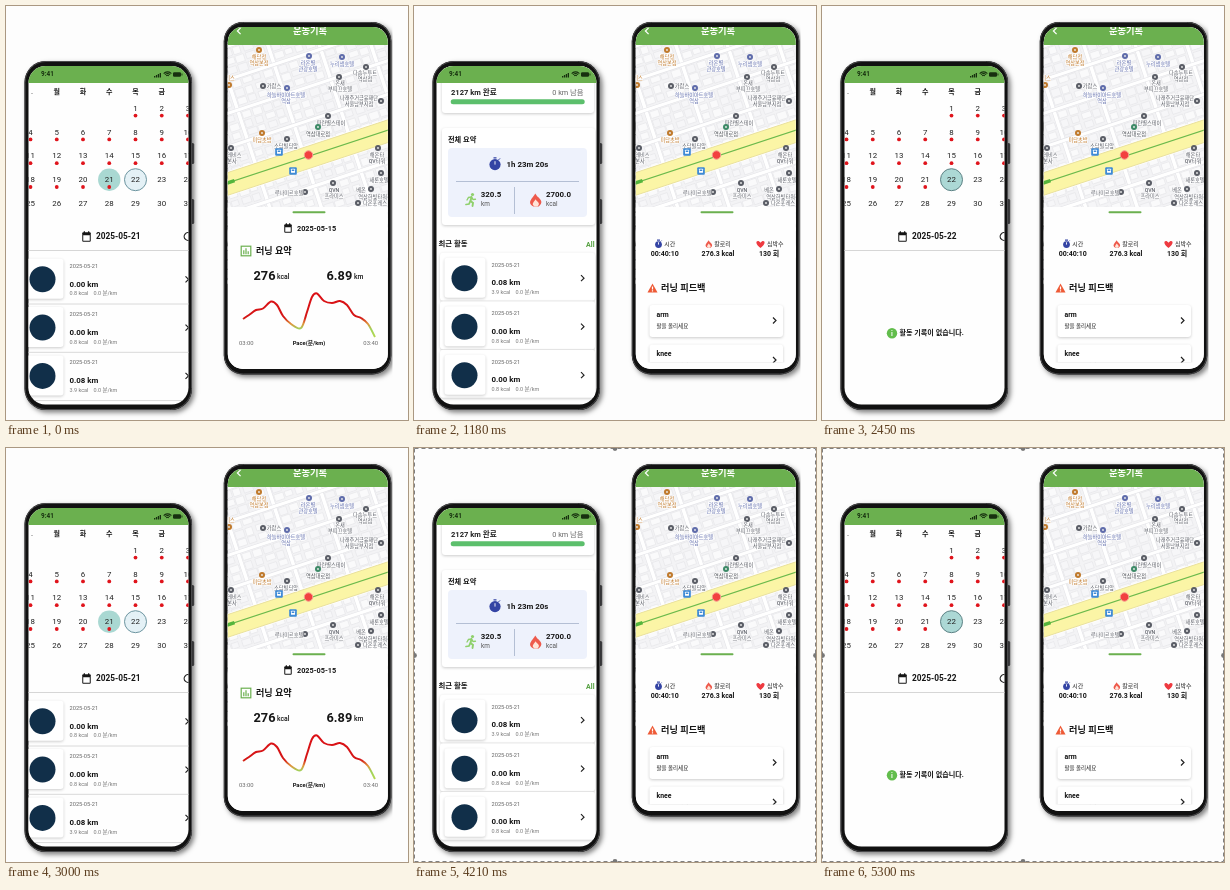
Write an HTML page with a canvas that moves like this. It is 402x414 px and loops after 5.33 s.

```html
<!DOCTYPE html>
<html lang="ko">
<head>
<meta charset="utf-8">
<title>Running app screens</title>
<style>
html, body { margin: 0; width: 100%; height: 100%; overflow: hidden; background: #fdfdfd; }
canvas { display: block; width: 402px; height: 414px; }
</style>
</head>
<body>
<canvas id="stage"></canvas>
<script>
const W = 402, H = 414, LOOP = 5330, CYCLE = 3270;
const FONT = 'Roboto, "Noto Sans CJK KR", "Noto Sans CJK", sans-serif';
const GREEN = '#6bb04f', INK = '#161616', GREY = '#777', RED = '#e0141c';
const canvas = document.getElementById('stage');
const c = canvas.getContext('2d');
const dpr = window.devicePixelRatio || 1;
canvas.width = W * dpr;
canvas.height = H * dpr;

function text(s, x, y, size, color = INK, weight = 400, align = 'left') {
  c.font = `${weight} ${size}px ${FONT}`;
  c.fillStyle = color;
  c.textAlign = align;
  c.textBaseline = 'middle';
  c.fillText(s, x, y + 0.4);
}
function box(x, y, w, h, r, fill) {
  c.beginPath();
  c.roundRect(x, y, w, h, r);
  c.fillStyle = fill;
  c.fill();
}
function dot(x, y, r, fill, stroke) {
  c.beginPath();
  c.arc(x, y, r, 0, Math.PI * 2);
  if (fill) { c.fillStyle = fill; c.fill(); }
  if (stroke) { c.strokeStyle = stroke; c.lineWidth = 1; c.stroke(); }
}
function line(pts, color, width = 1) {
  c.beginPath();
  pts.forEach(([x, y], i) => i ? c.lineTo(x, y) : c.moveTo(x, y));
  c.strokeStyle = color;
  c.lineWidth = width;
  c.stroke();
}
function shadowed(color, blur, dx, dy, draw) {
  c.save();
  c.shadowColor = color;
  c.shadowBlur = blur * dpr;
  c.shadowOffsetX = dx * dpr;
  c.shadowOffsetY = dy * dpr;
  draw();
  c.restore();
}
function card(x, y, w, h) {
  shadowed('rgba(0,0,0,.2)', 3, 0, 1, () => box(x, y, w, h, 3, '#fff'));
}
function chevron(x, y, dir = 1, color = '#222', s = 3) {
  line([[x - dir * s / 2, y - s], [x + dir * s / 2, y], [x - dir * s / 2, y + s]], color, 1.2);
}

// ---- icons ----
function calendarIcon(x, y, s) {
  box(x - s / 2, y - s / 2, s, s + 1, 1, INK);
  box(x - s / 2 + 1, y - s / 2 + 3, s - 2, s - 3, 0, '#fff');
  box(x - s / 2 + 1.5, y - s / 2 - 1, 1.2, 2, 0, INK);
  box(x + s / 2 - 2.7, y - s / 2 - 1, 1.2, 2, 0, INK);
}
function stopwatch(x, y, r) {
  const blue = '#3444a4';
  dot(x, y + 0.6, r, blue);
  box(x - 1.5, y - r - 1.2, 3, 1.4, 0, blue);
  line([[x + r * 0.6, y - r * 0.7], [x + r * 0.9, y - r]], blue, 1);
  line([[x, y + 0.6], [x, y - r * 0.5]], '#fff', 0.9);
}
function flame(x, y, s) {
  const path = (k, fill) => {
    c.beginPath();
    c.moveTo(x - 0.1 * s * k, y + s - 2 * s * k);
    c.bezierCurveTo(x + 0.2 * s * k, y + s - 1.3 * s * k, x + 1.5 * s * k, y + s - 0.9 * s * k, x + 0.4 * s * k, y + s);
    c.lineTo(x - 0.4 * s * k, y + s);
    c.bezierCurveTo(x - 1.5 * s * k, y + s - 0.6 * s * k, x - 0.5 * s * k, y + s - 1.3 * s * k, x - 0.1 * s * k, y + s - 2 * s * k);
    c.fillStyle = fill;
    c.fill();
  };
  path(1, '#ee5a4c');
  path(0.55, '#ffe4d8');
}
function heart(x, y, s) {
  c.beginPath();
  c.moveTo(x, y + s);
  c.bezierCurveTo(x - s * 2.1, y - s * 0.4, x - s * 0.8, y - s * 1.6, x, y - s * 0.4);
  c.bezierCurveTo(x + s * 0.8, y - s * 1.6, x + s * 2.1, y - s * 0.4, x, y + s);
  c.fillStyle = '#ee3a40';
  c.fill();
}
function runner(x, y) {
  const g = '#8fd06c';
  c.lineCap = 'round';
  dot(x + 1.5, y - 5.5, 1.6, g);
  line([[x + 0.5, y - 3], [x - 0.5, y + 1], [x + 2, y + 3], [x + 1.5, y + 6]], g, 1.9);
  line([[x - 0.5, y + 1], [x - 2, y + 4], [x - 5, y + 4.5]], g, 1.7);
  line([[x - 4, y], [x - 2.5, y - 2.5], [x + 0.5, y - 3], [x + 2, y - 0.5], [x + 4.5, y - 0.8]], g, 1.4);
  c.lineCap = 'butt';
}
function warning(x, y) {
  c.beginPath();
  c.moveTo(x, y - 5);
  c.lineTo(x + 5, y + 4);
  c.lineTo(x - 5, y + 4);
  c.closePath();
  c.fillStyle = '#ee5a36';
  c.fill();
  box(x - 0.6, y - 2, 1.2, 3, 0, '#fff');
  box(x - 0.6, y + 1.8, 1.2, 1.2, 0, '#fff');
}

// ---- phone shell ----
function phone(x, y, w, h, r, draw) {
  shadowed('rgba(0,0,0,.5)', 5, 2.5, 2.5, () => box(x, y, w, h, r, '#111'));
  c.beginPath();
  c.roundRect(x + 0.5, y + 0.5, w - 1, h - 1, r);
  c.strokeStyle = '#4a4a4c';
  c.lineWidth = 1;
  c.stroke();
  c.save();
  c.beginPath();
  c.roundRect(x + 4, y + 5, w - 7.5, h - 10.5, r - 4);
  c.fillStyle = '#fefefe';
  c.fill();
  c.clip();
  draw();
  c.restore();
}

// ---- left phone ----
function statusBar() {
  box(20, 58, 168, 19, 0, GREEN);
  text('9:41', 35, 68, 6.4, '#17300f', 600);
  for (let i = 0; i < 4; i++) box(148 + i * 1.9, 70 - i, 1.3, 1.5 + i, 0, '#17300f');
  for (let i = 1; i < 4; i++) {
    c.beginPath();
    c.arc(161.5, 71, i * 1.7, -Math.PI * 0.77, -Math.PI * 0.23);
    c.strokeStyle = '#17300f';
    c.lineWidth = 1.1;
    c.stroke();
  }
  box(167, 66.3, 8, 4.4, 1.2, '#17300f');
  box(175.5, 67.5, 0.9, 2, 0, '#17300f');
}
function activity(x, y, km, kcal, arrow) {
  card(x - 47, y - 7, 41, 40);
  dot(x - 27, y + 13.5, 13, '#112f49');
  text('2025-05-21', x, y, 5.7, '#666');
  text(km + ' km', x, y + 18, 7.9, INK, 700);
  text(kcal + ' kcal', x, y + 27.6, 5.5, GREY);
  text('0.0 분/km', x + 24, y + 27.6, 5.5, GREY);
  chevron(arrow, y + 13.5);
}
function calendar(day) {
  const colX = i => 24.5 + i * 26.25, rowY = i => 102 + i * 23.8;
  ['일', '월', '화', '수', '목', '금', '토'].forEach((d, i) => {
    if (i > 0 && i < 6) text(d, colX(i), 85.2, 7, INK, 700, 'center');
  });
  dot(26, 87.5, 0.5, '#555');
  const x21 = colX(3), x22 = colX(4), y3 = rowY(3) + 0.3;
  if (day === 21) {
    dot(x21, y3, 11.2, '#a9d8d2');
    dot(x22, y3, 11, '#e4f1f6', '#6d95a0');
  } else {
    dot(x22, y3, 11, '#acd8d5', '#5d8285');
  }
  for (let d = 1; d <= 31; d++) {
    const k = d + 3, x = colX(k % 7), y = rowY(Math.floor(k / 7));
    text(d, x, y, 7.9, '#222', 400, 'center');
    if (d < 22) dot(x, y + 7.6, 1.9, RED);
  }
  calendarIcon(80.5, 230.5, 8.5);
  text('2025-05-' + day, 90, 230, 8.3, INK, 600);
  c.beginPath();
  c.arc(182, 230.5, 3.8, 0.7, Math.PI * 1.75);
  c.strokeStyle = '#222';
  c.lineWidth = 1.2;
  c.stroke();
  line([[22, 244.5], [186, 244.5]], '#d6d6d6');
  if (day === 21) {
    ['0.00', '0.00', '0.08'].forEach((km, i) => {
      const y = 259.8 + i * 48.3;
      activity(63.5, y, km, km === '0.08' ? '3.9' : '0.8', 181);
      line([[22, y + 38.2], [186, y + 38.2]], '#d9d9d9');
    });
  } else {
    dot(70, 327.3, 5.2, '#62bd4c');
    text('i', 70, 327.2, 7, '#fff', 700, 'center');
    text('활동 기록이 없습니다.', 77.5, 327, 7.1, INK, 700);
  }
}
function home() {
  card(28, 60, 152, 47);
  text('2127 km 완료', 37, 86.6, 7.6, '#222', 600);
  text('0 km 남음', 169.5, 86.6, 7.3, '#666', 400, 'right');
  box(36.7, 93.2, 134, 5, 2.5, '#5cbf6c');
  card(28, 122, 153, 97);
  text('전체 요약', 34, 133.6, 7.2, INK, 700);
  box(34, 142, 139, 69, 4, '#eef2fc');
  stopwatch(81, 158, 5.6);
  text('1h 23m 20s', 92.5, 158.2, 7.9, INK, 700);
  line([[42, 175.5], [165, 175.5]], '#b4bfd4');
  line([[100.5, 181], [100.5, 208]], '#b4bfd4');
  runner(57, 194);
  text('320.5', 66.8, 188, 7.9, INK, 700);
  text('km', 67, 198, 6.4, '#555');
  flame(122, 194, 6.5);
  text('2700.0', 132, 188, 7.9, INK, 700);
  text('kcal', 132, 198, 6.4, '#555');
  text('최근 활동', 24.5, 237, 7.4, INK, 700);
  text('All', 180.5, 239, 7, '#4f9d3a', 700, 'right');
  ['0.08', '0.00', '0.00'].forEach((km, i) => {
    const y = 258.7 + i * 48.5;
    card(26, y - 12, 155, 48);
    activity(77.5, y, km, km === '0.08' ? '3.9' : '0.8', 168.5);
  });
}
function leftPhone(p) {
  box(185, 137, 3.2, 21, 1.5, '#5a5a5c');
  box(185, 193, 3.2, 25, 1.5, '#5a5a5c');
  phone(18.5, 55, 167.5, 349, 21, () => {
    if (p < 620 || p >= 2880) calendar(21);
    else if (p < 1380) home();
    else calendar(22);
    statusBar();
  });
}

// ---- right phone ----
const ORANGE = '#c07a2c', SLATE = '#5a5d66', BLUE = '#5f6cab', TEAL = '#3d8a67';
// pin x, pin y, pin colour, label x, label y, label lines
const places = [
  [253, 44, ORANGE, 253, 51, '해담정|역삼본점'],
  [303, 50, BLUE, 302, 57, '라온별|관광호텔'],
  [336, 51, BLUE, 336, 58, '누리샘호텔'],
  [360, 61, SLATE, 359, 67, '다솜누투트|역삼점'],
  [333, 71, SLATE, 334, 77, '온새|부띠끄호텔'],
  [257, 80, SLATE, 268, 80.5, '가람스'],
  [281, 82, BLUE, 280, 89, '하늘바이아트호텔|역삼'],
  [375, 95, SLATE, 353, 92, '나래주거금융재단|서울남부지점'],
  [223, 79, ORANGE, 224, 72, '미스'],
  [322, 110, SLATE, 325, 117, '파란별스테이'],
  [312, 121, TEAL, 312, 128, '역삼대로점'],
  [256, 127, ORANGE, 256, 134, '미담초밥'],
  [281, 133, SLATE, 280, 140, '소담빌딩앞'],
  [225, 142, SLATE, 226, 149, '두레비스|본사'],
  [372, 142, SLATE, 371, 149, '해온타|QV타워'],
  [299, 186, SLATE, 283, 187, '루나미르호텔'],
  [327, 177, SLATE, 328, 184, 'QVN|프라미스'],
  [375, 167, SLATE, 373, 174, '새론호텔'],
  [365, 183, SLATE, 355, 184, '베온'],
  [352, 197, SLATE, 369, 191, '역삼한빛타워점|다온포레스']
];
function map() {
  box(218, 36, 170, 170, 0, '#f3f3f5');
  let seed = 7;
  const rnd = () => (seed = (seed * 16807) % 2147483647) / 2147483647;
  c.save();
  c.translate(302, 151.5);
  c.rotate(-0.318);
  for (let i = -12; i < 12; i++) {
    for (let j = -14; j < 9; j++) {
      const x = i * 11 + Math.floor(i / 4) * 5, y = j * 9 + Math.floor(j / 3) * 5;
      box(x, y, 7 + rnd() * 3, 5.5 + rnd() * 2.5, 0, rnd() < 0.5 ? '#fafafb' : '#f6f6f8');
      c.strokeStyle = '#e5e5e9';
      c.lineWidth = 0.6;
      c.stroke();
    }
  }
  const street = (pts, width) => {
    line(pts, '#e2e2e6', width + 1);
    line(pts, '#fff', width);
  };
  for (let i = -3; i < 4; i++) street([[i * 49 - 3, -160], [i * 49 - 3, 120]], 3.6);
  for (let j = -5; j < 4; j++) street([[-150, j * 32 - 3], [150, j * 32 - 3]], 3.2);
  box(-150, -12, 300, 24, 0, '#fff');
  box(-150, -10.8, 300, 21.6, 0, '#fbf5a6');
  line([[-150, -10.8], [150, -10.8]], '#e6dd98', 0.8);
  line([[-150, 10.8], [150, 10.8]], '#e6dd98', 0.8);
  line([[-150, -1], [150, -1]], '#6cba4c', 1);
  line([[-92, -1], [-77, -1]], '#55b53c', 3.4);
  c.restore();
  for (const [px, py, color, x, y, label] of places) {
    dot(px, py, 3, color);
    dot(px, py, 0.9, '#eee');
    label.split('|').forEach((s, i) => {
      c.font = `500 5.2px ${FONT}`;
      c.textAlign = 'center';
      c.textBaseline = 'middle';
      c.strokeStyle = '#fff';
      c.lineWidth = 1.2;
      c.strokeText(s, x, y + i * 6.4 + 0.4);
      text(s, x, y + i * 6.4, 5.2, color === TEAL ? '#44484f' : color, 500, 'center');
    });
  }
  for (const [x, y] of [[273, 146], [287, 165]]) {
    box(x - 3.8, y - 3.8, 7.6, 7.6, 1, '#3e8ad6');
    box(x - 2, y - 2.2, 4, 4, 0.5, '#fff');
    box(x - 1.3, y - 1.4, 2.6, 1.4, 0, '#3e8ad6');
  }
  dot(302.5, 149, 4.2, '#f2413f', '#f79a8f');
}
const pace = [[237, 313], [243, 309], [250, 304], [257, 302.5], [265, 295.5], [271, 299], [277, 310], [285, 318],
  [295, 322], [301, 306], [306, 291], [311, 287.5], [318, 295], [326, 297], [334, 295], [341, 299], [348, 309],
  [355, 312], [362, 318], [369, 331]];
function chart() {
  const g = c.createLinearGradient(0, 287, 0, 331);
  g.addColorStop(0, '#dc1016');
  g.addColorStop(0.56, '#d41616');
  g.addColorStop(0.7, '#e0953c');
  g.addColorStop(0.82, '#9fd35c');
  g.addColorStop(1, '#b5d84e');
  const at = i => pace[Math.min(pace.length - 1, Math.max(0, i))];
  c.beginPath();
  c.moveTo(...pace[0]);
  for (let i = 0; i < pace.length - 1; i++) {
    const [a, p, q, b] = [at(i - 1), at(i), at(i + 1), at(i + 2)];
    c.bezierCurveTo(p[0] + (q[0] - a[0]) / 6, p[1] + (q[1] - a[1]) / 6,
      q[0] - (b[0] - p[0]) / 6, q[1] - (b[1] - p[1]) / 6, q[0], q[1]);
  }
  c.strokeStyle = g;
  c.lineWidth = 2;
  c.stroke();
}
function feedback(y, title, note) {
  card(235.5, y, 133.5, 32);
  text(title, 242.5, y + 9.2, 6.9, INK, 700);
  text(note, 242.5, y + 21.3, 5.5, '#222', 500);
  chevron(360.5, y + 15.5);
}
function sheet(scroll) {
  box(217, 201, 170, 165, [7, 7, 0, 0], '#fefefe');
  c.save();
  c.beginPath();
  c.rect(217, 213, 170, 143.5);
  c.clip();
  c.translate(0, -scroll);
  calendarIcon(282, 222, 7.5);
  text('2025-05-15', 291, 222, 7.3, INK, 600);
  c.strokeStyle = GREEN;
  c.lineWidth = 1.2;
  c.strokeRect(235.2, 240.2, 9.6, 9.6);
  [[237.2, 4], [239.4, 6], [241.6, 3]].forEach(([x, h]) => box(x, 248.3 - h, 1.2, h, 0, GREEN));
  text('러닝 요약', 250, 245, 9.1, INK, 700);
  text('276', 247.5, 270, 12.8, INK, 700);
  text('kcal', 271, 271, 6.8, INK, 500);
  text('6.89', 320.5, 270, 12.8, INK, 700);
  text('km', 348, 271, 6.8, INK, 500);
  chart();
  text('03:00', 233, 336.5, 5.9, '#666');
  text('Pace(분/km)', 303, 336.5, 5.8, INK, 600, 'center');
  text('03:40', 372, 336.5, 5.9, '#666', 400, 'right');
  stopwatch(244.5, 366, 3.4);
  text('시간', 250.3, 366, 6, '#222', 500);
  flame(295, 366, 3.8);
  text('칼로리', 300.3, 366, 6, '#222', 500);
  heart(346.5, 366.3, 3.6);
  text('심박수', 353, 366, 6, '#222', 500);
  text('00:40:10', 250.8, 376, 7, INK, 700, 'center');
  text('276.3 kcal', 304, 376, 7, INK, 700, 'center');
  text('130 회', 355, 376, 7, INK, 700, 'center');
  warning(238.5, 410.5);
  text('러닝 피드백', 247, 410, 9.2, INK, 700);
  feedback(427, 'arm', '팔을 올리세요');
  feedback(466.5, 'knee', '무릎을 올리세요');
  c.restore();
  box(286.5, 205.3, 33, 2, 1, GREEN);
}
function ease(p, from, to) {
  const k = Math.min(1, Math.max(0, (p - from) / (to - from)));
  return k * k * (3 - 2 * k);
}
function rightPhone(p) {
  c.save();
  c.beginPath();
  c.rect(200, 0, 186.5, H);
  c.clip();
  phone(217.8, 16, 167.5, 352.5, 19, () => {
    map();
    box(217, 18, 170, 21, 0, GREEN);
    chevron(233, 25, -1, '#fff', 3.2);
    text('운동기록', 304, 25, 9.3, '#fff', 700, 'center');
    sheet(p < 2480 ? 48.3 * ease(p, 160, 390) + 79.7 * ease(p, 690, 930) : 0);
  });
  c.restore();
}

// ---- selection outline ----
function selection() {
  c.setLineDash([4, 3]);
  c.strokeStyle = '#808080';
  c.lineWidth = 1;
  c.strokeRect(0.5, 0.5, W - 1, H - 1);
  c.setLineDash([]);
  for (const [x, y] of [[201, 0.5], [201, 413.5], [0.5, 207.5], [401.5, 207.5]]) dot(x, y, 2.4, '#777');
}

function draw(t) {
  const p = t % CYCLE;
  c.setTransform(dpr, 0, 0, dpr, 0, 0);
  box(0, 0, W, H, 0, '#fdfdfd');
  leftPhone(p);
  rightPhone(p);
  if (t >= CYCLE) selection();
}
const start = performance.now();
function tick() {
  draw((performance.now() - start) % LOOP);
  requestAnimationFrame(tick);
}
tick();
</script>
</body>
</html>
```
